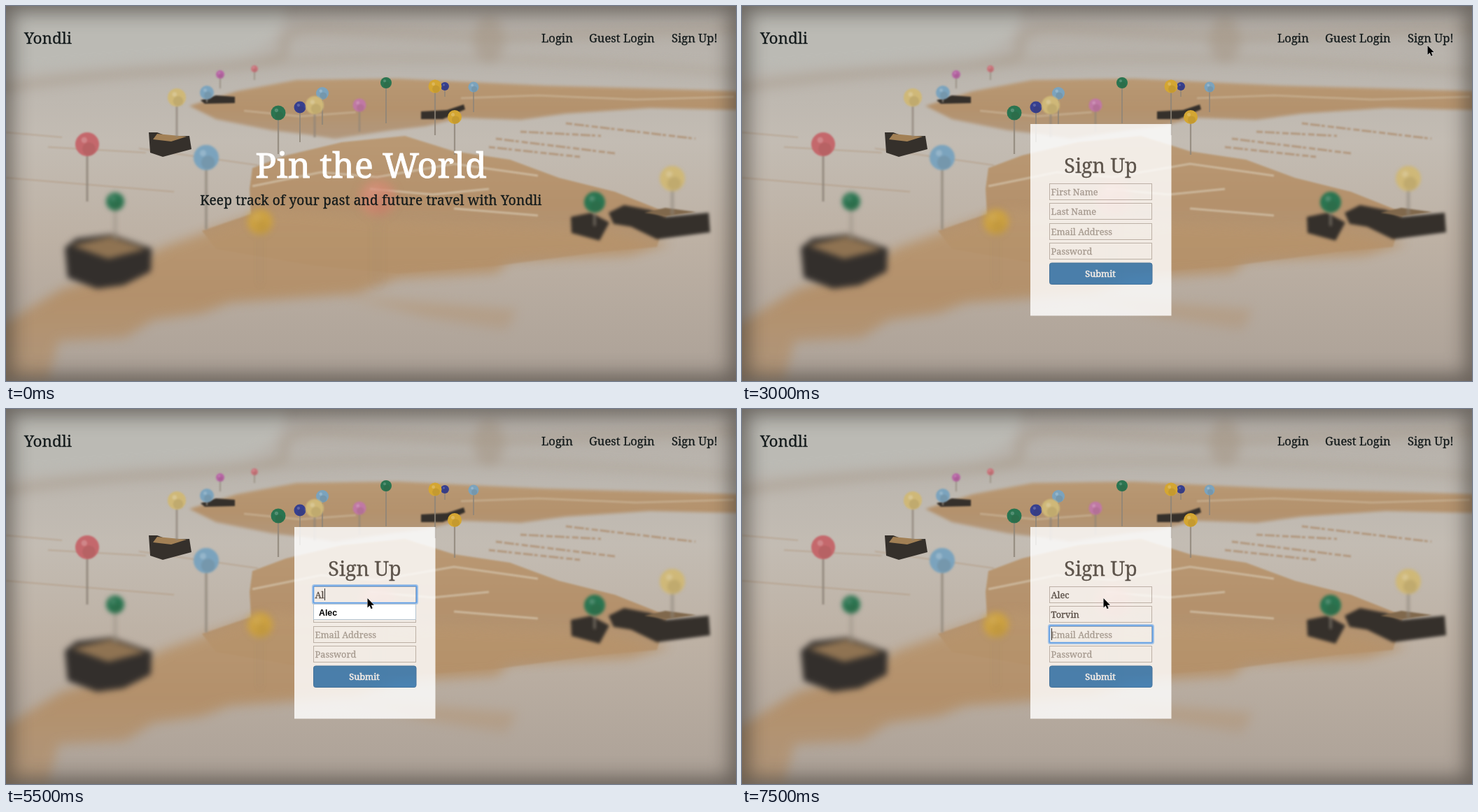
An HTML page for the animation above (8000 ms loop, 1043 by 537 pixels).

```html
<!DOCTYPE html>
<html lang="en">
<head>
<meta charset="utf-8">
<title>Pin the World</title>
<style>
  html, body { margin: 0; width: 100%; height: 100%; overflow: hidden; background: #b5aca2; }
  svg { display: block; width: 100%; height: 100%; }
  text { font-family: "Noto Serif", serif; stroke: currentColor; stroke-width: .3px; fill: currentColor; }
  .soft1 { filter: blur(1px); }
  .soft2 { filter: blur(2px); }
  .soft4 { filter: blur(4px); }
  .soft8 { filter: blur(8px); }
  .nav { font-size: 16.6px; color: #12191a; }
  .hero { letter-spacing: .013em; }
  .field { font-size: 12.8px; }
  #menuText { font: bold 12.3px "Liberation Sans", Arial, sans-serif; stroke: none; }
</style>
</head>
<body>
<svg viewBox="0 0 1043 537" preserveAspectRatio="none">
  <defs>
    <linearGradient id="paper" x2="0" y2="1">
      <stop offset="0" stop-color="#b3ada6"/>
      <stop offset=".16" stop-color="#bab5ae"/>
      <stop offset=".36" stop-color="#c3bcb3"/>
      <stop offset=".62" stop-color="#bdb1a4"/>
      <stop offset="1" stop-color="#aca197"/>
    </linearGradient>
    <linearGradient id="land" x2="0" y2="1">
      <stop offset="0" stop-color="#b9966e"/>
      <stop offset=".5" stop-color="#b38e66"/>
      <stop offset="1" stop-color="#b09579"/>
    </linearGradient>
  </defs>

  <rect width="1043" height="537" fill="url(#paper)"/>

  <!-- distant, out-of-focus paper edges -->
  <g class="soft8" fill="none">
    <path d="M0 0H400Q395 60 330 70L0 95Z" fill="#bbbab4"/>
    <path d="M-10 118Q120 98 250 92T400 66Q385 36 440 32L700 45L1050 32" stroke="#9f8e7b" stroke-width="8" opacity=".55"/>
    <path d="M330 86Q600 60 1050 96" stroke="#a99b8b" stroke-width="7" opacity=".6"/>
    <ellipse cx="690" cy="48" rx="22" ry="34" fill="#a39482" opacity=".5"/>
  </g>

  <!-- map -->
  <g fill="url(#land)">
    <path class="soft2" d="M262 143L330 122L415 106L560 104L770 114L1050 122V149L920 146L800 154L735 163L650 160L600 172L550 178L470 190L430 184L380 178L300 162Z" opacity=".9"/>
    <path class="soft1" d="M348 262L352 232L400 214L480 195L570 186L640 208L720 220L790 246L870 266L945 296L930 345L850 352L700 372L560 383L440 372L300 348L280 322L350 298Z" opacity=".9"/>
    <path class="soft8" d="M225 345L380 290L590 310L850 320L950 340L890 357L720 365L700 382L560 390L500 412L320 425L280 440L210 450L170 475L75 480L60 537H-20V465L80 405L130 390Z" opacity=".9"/>
    <path class="soft8" d="M480 415L730 435L715 465L600 445Z" opacity=".4"/>
  </g>

  <!-- pale inlets and printed lines -->
  <g class="soft1" fill="none" stroke="#cbb79c" stroke-width="3">
    <path d="M352 258L450 238L530 245L640 226L760 243M520 262L610 270L690 262M640 290L760 300"/>
    <path d="M650 132L760 128L900 134L1040 130M340 150L420 158L500 152" opacity=".6"/>
  </g>
  <g class="soft1" fill="none" stroke="#a98563" opacity=".65">
    <path d="M0 181L80 188M0 246L240 266M60 202L200 210M190 204L360 228"/>
    <path d="M700 190L870 211M735 180L850 186M800 168L985 190M690 202L820 216" stroke-width="3" stroke-dasharray="9 3 14 2 5 4"/>
  </g>

  <!-- wooden pieces -->
  <g class="soft4">
    <path d="M84 346L100 333L150 327L208 347L207 380L168 400L130 405L88 389Z" fill="#332f2c"/>
    <path d="M94 343L150 330L200 348L146 362Z" fill="#8f7352"/>
  </g>
  <g fill="#35302b">
    <path d="M204 181L216 181L232 187L262 186L265 205L224 216L206 210Z"/>
    <path d="M216 183L258 187L236 194L210 191Z" fill="#a28055"/>
    <path class="soft1" d="M278 135L300 128L327 130V139L284 140Z"/>
    <path class="soft1" d="M593 151L630 149L654 141L656 148L624 162L593 162Z"/>
    <path class="soft2" d="M807 302L836 296L862 310L848 336L808 325ZM861 296L883 285L920 292L942 302L1004 296L1006 324L930 334L893 316L868 312Z"/>
    <path class="soft1" d="M912 296L942 289L986 295L944 301Z" fill="#80684c"/>
  </g>

  <g id="pins"></g>
  <rect x="-8" y="-8" width="1059" height="553" fill="none" stroke="#35302b" stroke-width="34" opacity=".58" style="filter:blur(14px)"/>

  <text x="26" y="54" font-size="22.5" color="#12191a">Yondli</text>
  <g class="nav">
    <text x="765" y="52">Login</text>
    <text x="833" y="52">Guest Login</text>
    <text x="951" y="52">Sign Up!</text>
  </g>
  <rect id="underline" x="951" y="67" width="66" height="1.5" fill="#d5d0c9"/>

  <g id="hero" class="hero" text-anchor="middle">
    <text x="521.5" y="246" font-size="49.9" color="#fff" style="stroke-width:1px">Pin the World</text>
    <text x="521.5" y="285" font-size="19" color="#12191a">Keep track of your past and future travel with Yondli</text>
  </g>

  <g id="form">
    <g opacity=".82">
      <rect x="412" y="169" width="201.5" height="274.5" fill="#fff"/>
      <text x="512.5" y="239" font-size="28.7" text-anchor="middle" color="#4a4644">Sign Up</text>
      <g id="fields" class="field"></g>
      <rect x="439.5" y="368" width="146.5" height="30.5" rx="3" fill="#337ab7" stroke="#2e6da4"/>
      <text class="field" x="512" y="388" text-anchor="middle" color="#fff" style="stroke-width:.6px">Submit</text>
    </g>
    <g id="ring" fill="none" stroke="#5c9de6">
      <rect x="438.5" y="-1.5" width="149" height="26" rx="2" stroke-width="3" opacity=".5"/>
      <rect x="439.5" y="-.5" width="147" height="24" rx="1" stroke-width="1.6"/>
    </g>
    <rect id="caret" width="1" height="17" fill="#34302e"/>
    <g id="menu">
      <rect x="439.5" y=".5" width="146" height="22" fill="#fff" stroke="#b4c4d0"/>
      <text id="menuText" x="447" y="17" color="#000"></text>
    </g>
  </g>

  <path id="cursor" d="M0 0V13.5L3.1 10.6L5.1 15.2L7.2 14.3L5.3 9.8H9.4Z" fill="#000" stroke="#fff" stroke-width="1" paint-order="stroke"/>
</svg>

<script>
const $ = id => document.getElementById(id);

function add(parent, tag, attrs) {
  const el = document.createElementNS("http://www.w3.org/2000/svg", tag);
  for (const key in attrs) el.setAttribute(key, attrs[key]);
  return parent.appendChild(el);
}

// colour, then x, y, radius, needle end y and blur for each pin
const pins = {
  "#c4686c": [[116, 198, 17, 280, 1.2]],
  "#c9757c": [[355, 90, 5, 106, 1]],
  "#d98873": [[531, 275, 25, 400, 7]],
  "#b765a5": [[306, 98, 6, 118, .8]],
  "#c078a5": [[505, 142, 9.5, 180, .8]],
  "#7ba3bd": [[286, 217, 18, 320, 1.6], [287, 124, 10, 138, 1], [452, 125, 9, 170, .7], [668, 116, 7.5, 152, .6]],
  "#363f8f": [[420, 145, 8.5, 195, .5], [627, 115, 6, 130, .6]],
  "#2a7450": [[156, 280, 13, 335, 3], [389, 153, 10.5, 212, .4], [543, 110, 8, 168, .4], [841, 281, 15, 315, 2]],
  "#cfb878": [[244, 131, 13, 188, .8], [441, 142, 13, 188, .8], [952, 247, 18, 300, 2.2]],
  "#d4a632": [[613, 115, 9.5, 185, .6], [641, 159, 10, 213, .4], [363, 309, 18, 400, 5]]
};

for (const [color, group] of Object.entries(pins)) {
  for (const [x, y, r, end, blur] of group) {
    const faint = blur > 4;
    const pin = add($("pins"), "g", { style: `filter:blur(${blur}px)`, opacity: faint ? .75 : 1 });
    add(pin, "path", { d: `M${x} ${y}V${end}`, stroke: "#8e8579", "stroke-width": 1 + r / 8, opacity: faint ? .25 : .8 });
    add(pin, "circle", { cx: x, cy: y, r, fill: color });
    add(pin, "circle", { cx: x + r * .15, cy: y + r * .4, r: r * .55, fill: "#40301f", opacity: .1 });
    add(pin, "circle", { cx: x - r * .25, cy: y - r * .35, r: r * .25, fill: "#fff", opacity: .2 });
  }
}

const rowTop = i => 254 + Math.round(i * 28.4);
const hints = ["First Name", "Last Name", "Email Address", "Password"];
const fields = hints.map((_, i) => {
  add($("fields"), "rect", { x: 439.5, y: rowTop(i) + .5, width: 146, height: 23, fill: "#fff", stroke: "#bdb7b2" });
  return add($("fields"), "text", { x: 441.5, y: rowTop(i) + 17 });
});

const first = "Alec", last = "Torvin";
const steps = [
  { at: 0, values: ["", ""], focus: -1 },
  { at: 750, cursor: [964, 34] },
  { at: 1000, cursor: [984, 51] },
  { at: 1250, cursor: [979.5, 56.5] },
  { at: 2250, underline: true },
  { at: 3000, underline: false, form: true },
  { at: 3500, cursor: [651, 172] },
  { at: 3750, cursor: [530, 214] },
  { at: 4000, cursor: [517, 268] },
  { at: 4250, cursor: [516.5, 271] },
  { at: 4500, focus: 0, caret: true },
  { at: 5000, caret: false },
  { at: 5250, caret: true, menu: first, values: [first.slice(0, 1), ""] },
  { at: 5500, values: [first.slice(0, 2), ""] },
  { at: 5750, values: [first, ""] },
  { at: 6000, focus: 1, menu: "" },
  { at: 6500, menu: last, values: [first, last.slice(0, 1)] },
  { at: 6750, values: [first, last.slice(0, 3)] },
  { at: 7000, values: [first, last] },
  { at: 7500, focus: 2, menu: "" }
];

const show = (id, on) => $(id).style.display = on ? "" : "none";
const move = (id, x, y) => $(id).setAttribute("transform", `translate(${x} ${y})`);

function draw() {
  const time = performance.now() % 8000;
  const state = Object.assign({}, ...steps.filter(step => step.at <= time));
  const { focus, values, cursor, menu } = state;

  show("hero", !state.form);
  show("form", state.form);
  show("underline", state.underline);
  show("cursor", cursor);
  show("ring", focus >= 0);
  show("caret", state.caret);
  show("menu", menu);
  if (cursor) move("cursor", ...cursor);

  fields.forEach((field, i) => {
    field.textContent = values[i] || hints[i];
    field.setAttribute("color", values[i] ? "#443f3c" : "#a39d98");
  });

  if (focus >= 0) {
    const top = rowTop(focus);
    const typed = values[focus] ? fields[focus].getComputedTextLength() : 0;
    move("ring", 0, top);
    move("caret", 442 + Math.round(typed), top + 3);
    move("menu", 0, top + 25);
    $("menuText").textContent = menu || "";
  }
  requestAnimationFrame(draw);
}
draw();
</script>
</body>
</html>
```
